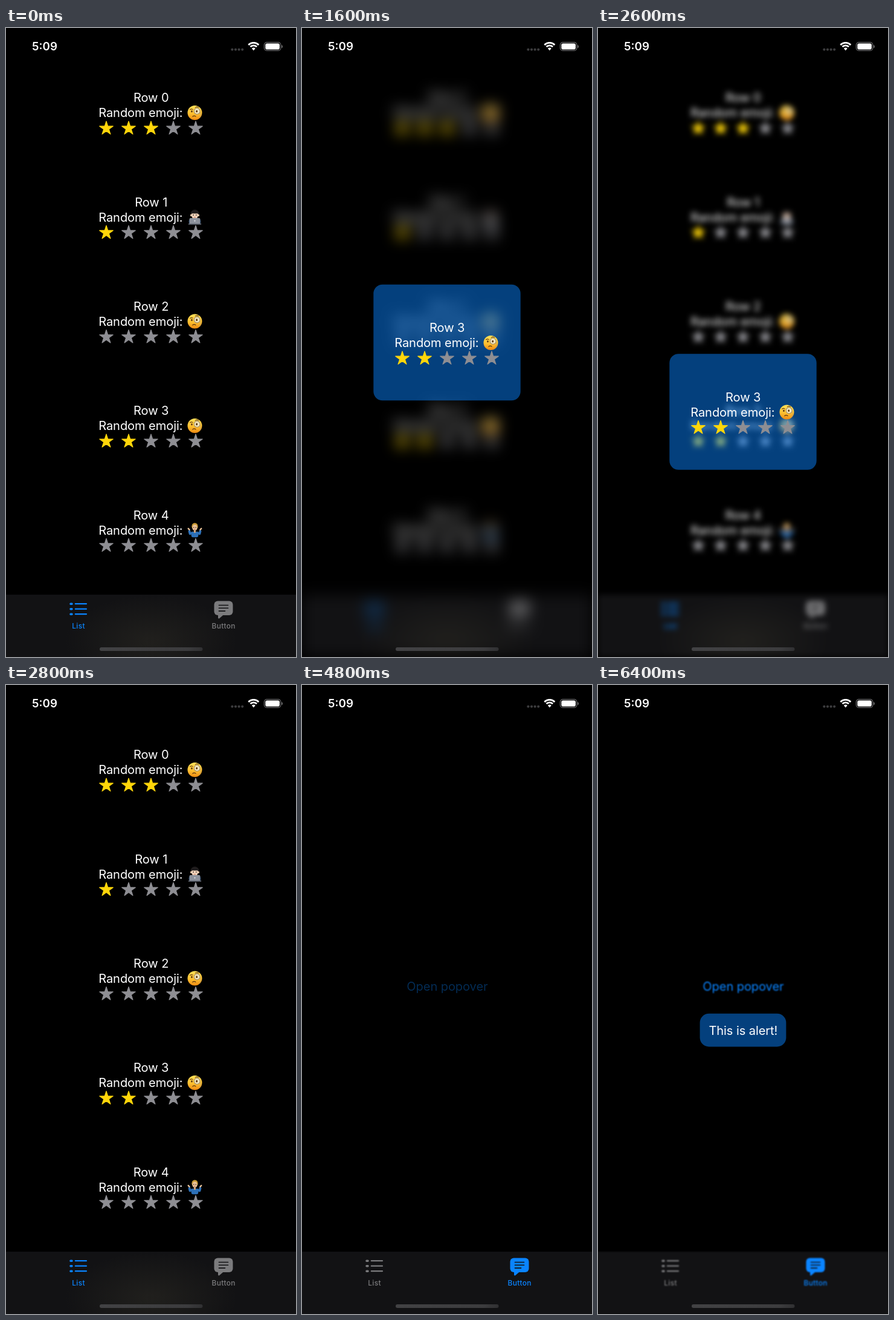
These frames come from a looping animation (480x1039 px, 6.5 s). An HTML page with a canvas:

```html
<!DOCTYPE html>
<html lang="en">
<head>
<meta charset="utf-8">
<title>Popover demo</title>
<style>
  html, body { margin: 0; width: 100%; height: 100%; overflow: hidden; background: #000; }
  canvas { display: block; width: 480px; height: 1039px; }
</style>
</head>
<body>
<canvas id="stage" width="480" height="1039"></canvas>
<script>
const W = 480, H = 1039, LOOP = 6500, STEP = 100;
const BLUE = '#0a84ff', GREY = '#8e8e93', YELLOW = '#ffd60a', TAB_GREY = '#7b7b7d';
const BAR = '#121214', POPUP = 'rgba(10,132,255,.49)';
const FONT = 'Inter, "Open Sans", sans-serif';
const MAX_BLUR = 12.5, FADE = 350;
const ROWS = [
  { stars: 3, face: monocle }, { stars: 1, face: technician }, { stars: 0, face: monocle },
  { stars: 2, face: monocle }, { stars: 0, face: shrug }
];

const view = document.getElementById('stage').getContext('2d');
const layer = document.createElement('canvas');
layer.width = W;
layer.height = H;
const page = layer.getContext('2d');

const clamp = v => Math.max(0, Math.min(1, v));

// cubic-bezier(.42, 0, .58, 1)
function easeInOut(x) {
  if (x <= 0) return 0;
  if (x >= 1) return 1;
  let lo = 0, hi = 1;
  for (let i = 0; i < 24; i++) {
    const s = (lo + hi) / 2, r = 1 - s;
    if (3 * r * r * s * .42 + 3 * r * s * s * .58 + s * s * s < x) lo = s; else hi = s;
  }
  return lo * lo * (3 - 2 * lo);
}

function box(c, x, y, w, h, r, color) {
  c.beginPath();
  c.roundRect(x, y, w, h, r);
  c.fillStyle = color;
  c.fill();
}

function oval(c, x, y, rx, ry, color) {
  c.beginPath();
  c.ellipse(x, y, rx, ry, 0, 0, Math.PI * 2);
  c.fillStyle = color;
  c.fill();
}

function line(c, width, color, ...p) {
  c.beginPath();
  c.moveTo(p[0], p[1]);
  for (let i = 2; i < p.length; i += 2) c.lineTo(p[i], p[i + 1]);
  c.lineWidth = width;
  c.strokeStyle = color;
  c.lineCap = c.lineJoin = 'round';
  c.stroke();
}

function arc(c, x, y, r, a, b, width, color) {
  c.beginPath();
  c.arc(x, y, r, a, b);
  c.lineWidth = width;
  c.strokeStyle = color;
  c.stroke();
}

function label(c, str, x, y, color, size = 20.1, weight = 400, align = 'center', space = -.1) {
  c.font = `${weight} ${size}px ${FONT}`;
  c.letterSpacing = space + 'px';
  c.textAlign = align;
  c.textBaseline = 'alphabetic';
  c.fillStyle = color;
  c.fillText(str, x, y);
}

function star(c, x, y, color) {
  c.beginPath();
  for (let i = 0; i < 10; i++) {
    const r = i % 2 ? 4.5 : 11.8, a = i * Math.PI / 5;
    c.lineTo(x + r * Math.sin(a), y - r * Math.cos(a));
  }
  c.closePath();
  c.fillStyle = c.strokeStyle = color;
  c.lineWidth = 1.2;
  c.lineJoin = 'round';
  c.fill();
  c.stroke();
}

function monocle(c) {
  const skin = c.createLinearGradient(0, -12, 0, 12);
  skin.addColorStop(0, '#ffe25a');
  skin.addColorStop(.55, '#fdc030');
  skin.addColorStop(1, '#ee8a12');
  oval(c, 0, 0, 12, 12, skin);
  const ink = '#5b3410';
  line(c, .8, '#b39a62', 8.8, -1, 9.6, 3, 8.2, 8);
  oval(c, 3.7, -2.6, 4.9, 4.9, '#f3e7bd');
  arc(c, 3.7, -2.6, 4.9, 0, 7, 1.1, '#a08c68');
  oval(c, 3.2, -2.4, 1.4, 1.9, ink);
  oval(c, -5, -2.2, 1.3, 1.8, ink);
  line(c, 1.1, ink, -8, -5.2, -5.6, -6.2, -3.4, -5.5);
  line(c, 1.1, ink, .8, -8.8, 3.6, -9.7, 6.2, -8.8);
  arc(c, -1, 9.2, 4, -2.3, -.9, 1.2, ink);
}

function technician(c) {
  box(c, -10, 3, 20, 9, 4, '#24405f');
  oval(c, 0, -5.6, 6.9, 6.6, '#1f1c1d');
  oval(c, -6.2, -3, 1.3, 1.9, '#efc7a8');
  oval(c, 6.2, -3, 1.3, 1.9, '#efc7a8');
  oval(c, 0, -3, 5.6, 5.8, '#f4d6bd');
  box(c, -5.6, -9.8, 11.2, 4, 2, '#1f1c1d');
  oval(c, -2.3, -3.4, .8, 1, '#33241f');
  oval(c, 2.3, -3.4, .8, 1, '#33241f');
  line(c, .8, '#b8604f', -1.4, .4, 1.4, .4);
  box(c, -8.8, 1.8, 17.6, 10, 1.5, '#8d929c');
  box(c, -10.8, 10.6, 21.6, 1.8, .9, '#666b76');
  oval(c, 0, 6.3, 1.1, 1.1, '#dfe3e8');
}

function shrug(c) {
  const skin = '#edc59c', shirt = '#2c70b8';
  line(c, 3.8, shirt, -4, 4.6, -8, 6.2, -9, 2);
  line(c, 3.8, shirt, 4, 4.6, 8, 6.2, 9, 2);
  line(c, 2.4, skin, -9, -.4, -10.8, -2.4);
  line(c, 2.4, skin, 9, -.4, 10.8, -2.4);
  box(c, -5.8, 3, 11.6, 9, 3, shirt);
  box(c, -1.7, 1, 3.4, 3.6, 1.4, '#d9ab80');
  oval(c, 0, -6, 5.1, 5.8, '#c99a35');
  oval(c, 0, -3.8, 4, 5, skin);
  oval(c, -1.7, -4.2, .7, .9, '#49301f');
  oval(c, 1.7, -4.2, .7, .9, '#49301f');
  line(c, .8, '#a45b45', -1.2, -1, 1.2, -1);
}

function drawRow(c, n, cy) {
  const row = ROWS[n];
  label(c, 'Row ' + n, 240.2, cy - 17.6, '#fff');
  label(c, 'Random emoji:', 153.2, cy + 7.4, '#fff', 20.1, 400, 'left');
  c.save();
  c.translate(312.5, cy);
  row.face(c);
  c.restore();
  for (let i = 0; i < 5; i++) star(c, 166 + i * 37, cy + 25.8, i < row.stars ? YELLOW : GREY);
}

function tabBar(c, list) {
  c.fillStyle = BAR;
  c.fillRect(0, 936, W, H - 936);
  if (list) {
    c.save();
    c.beginPath();
    c.rect(0, 936, W, H - 936);
    c.clip();
    c.translate(240, 1012);
    c.scale(1.9, 1);
    const glow = c.createRadialGradient(0, 0, 5, 0, 0, 75);
    glow.addColorStop(0, 'rgba(80,76,58,.22)');
    glow.addColorStop(1, 'rgba(80,76,58,0)');
    c.fillStyle = glow;
    c.fillRect(-130, -76, 260, 110);
    c.restore();
  }
  const left = list ? BLUE : TAB_GREY, right = list ? TAB_GREY : BLUE;
  for (const y of [951.2, 959.7, 968.2]) {
    box(c, 105.3, y - 1.7, 5.4, 3.4, 1.6, left);
    line(c, 2.2, left, 114.8, y, 133, y);
  }
  box(c, 344.5, 946.5, 31, 23.5, 6, right);
  c.beginPath();
  c.moveTo(351, 968);
  c.lineTo(351, 974);
  c.quadraticCurveTo(351.4, 976.4, 353.4, 975);
  c.lineTo(361, 968.5);
  c.fill();
  line(c, 1.6, BAR, 352.4, 953.5, 367.6, 953.5);
  line(c, 1.6, BAR, 352.4, 958.3, 367.6, 958.3);
  line(c, 1.6, BAR, 352.4, 963.1, 362.6, 963.1);
  label(c, 'List', 120, 992, left, 12, 500, 'center', .3);
  label(c, 'Button', 360.2, 992, right, 12, 500, 'center', .3);
}

function statusBar(c) {
  label(c, '5:09', 43, 37.3, '#fff', 18.8, 600, 'left', 0);
  for (let i = 0; i < 4; i++) oval(c, 374.4 + i * 5.6, 35.6, 2.1, 2.1, '#3c3c3e');
  const a = -Math.PI * .75, b = -Math.PI * .25;
  c.lineCap = 'butt';
  arc(c, 409.8, 36.4, 12, a, b, 2.9, '#fff');
  arc(c, 409.8, 36.4, 7.5, a, b, 2.8, '#fff');
  c.beginPath();
  c.moveTo(409.8, 37.2);
  c.arc(409.8, 36.6, 4.2, a, b);
  c.fillStyle = '#fff';
  c.fill();
  c.beginPath();
  c.roundRect(427.4, 23.6, 27.4, 13.8, 4.4);
  c.lineWidth = 1.2;
  c.strokeStyle = '#6c6c6e';
  c.stroke();
  box(c, 429.3, 25.5, 23.6, 10, 2.8, '#fff');
  box(c, 456.2, 28.3, 1.7, 4.6, [0, 1.6, 1.6, 0], '#6c6c6e');
}

function homeBar(c) {
  const g = c.createLinearGradient(155, 0, 326, 0);
  g.addColorStop(0, '#424244');
  g.addColorStop(.85, '#3c3c3e');
  g.addColorStop(1, '#303032');
  box(c, 155, 1023, 170.5, 6, 3, g);
}

// Scales in from the centre, leaves by sliding down its own height.
function phase(t, openAt, shutAt) {
  const scale = easeInOut((t - openAt) / FADE), slide = easeInOut((t - shutAt) / FADE);
  return { on: scale > .05 && slide < 1, scale, slide };
}

function popup(c, state, w, h, content) {
  c.save();
  c.translate(240, 519.5 + state.slide * h);
  c.scale(state.scale, state.scale);
  c.translate(-240, -519.5);
  box(c, 240 - w / 2, 519.5 - h / 2, w, h, 15, POPUP);
  content(c);
  c.restore();
}

function draw(ms) {
  const t = Math.floor(ms / STEP) * STEP;
  const list = t < 3800;
  const state = list ? phase(t, 1174, 2405) : phase(t, 4874, 6116);

  page.clearRect(0, 0, W, H);
  if (list) {
    ROWS.forEach((_, n) => drawRow(page, n, 140 + n * 172.3));
  } else {
    const press = Math.min(clamp((t - 4620) / 200), clamp((5250 - t) / 350));
    page.globalAlpha = 1 - .75 * press;
    label(page, 'Open popover', 240.4, 505.2, BLUE);
    page.globalAlpha = 1;
  }
  tabBar(page, list);

  view.fillStyle = '#000';
  view.fillRect(0, 0, W, H);
  const blur = state.on ? MAX_BLUR * state.scale * (1 - state.slide) : 0;
  view.filter = blur ? `blur(${blur.toFixed(2)}px)` : 'none';
  view.drawImage(layer, 0, 0);
  view.filter = 'none';

  if (state.on) {
    if (list) popup(view, state, 243.4, 191.6, c => drawRow(c, 3, 520));
    else popup(view, state, 142.8, 54.6, c => label(c, 'This is alert!', 240.3, 527.2, '#fff'));
  }
  statusBar(view);
  homeBar(view);
}

const start = performance.now();
function tick() {
  draw((performance.now() - start) % LOOP);
  requestAnimationFrame(tick);
}
tick();
</script>
</body>
</html>
```
